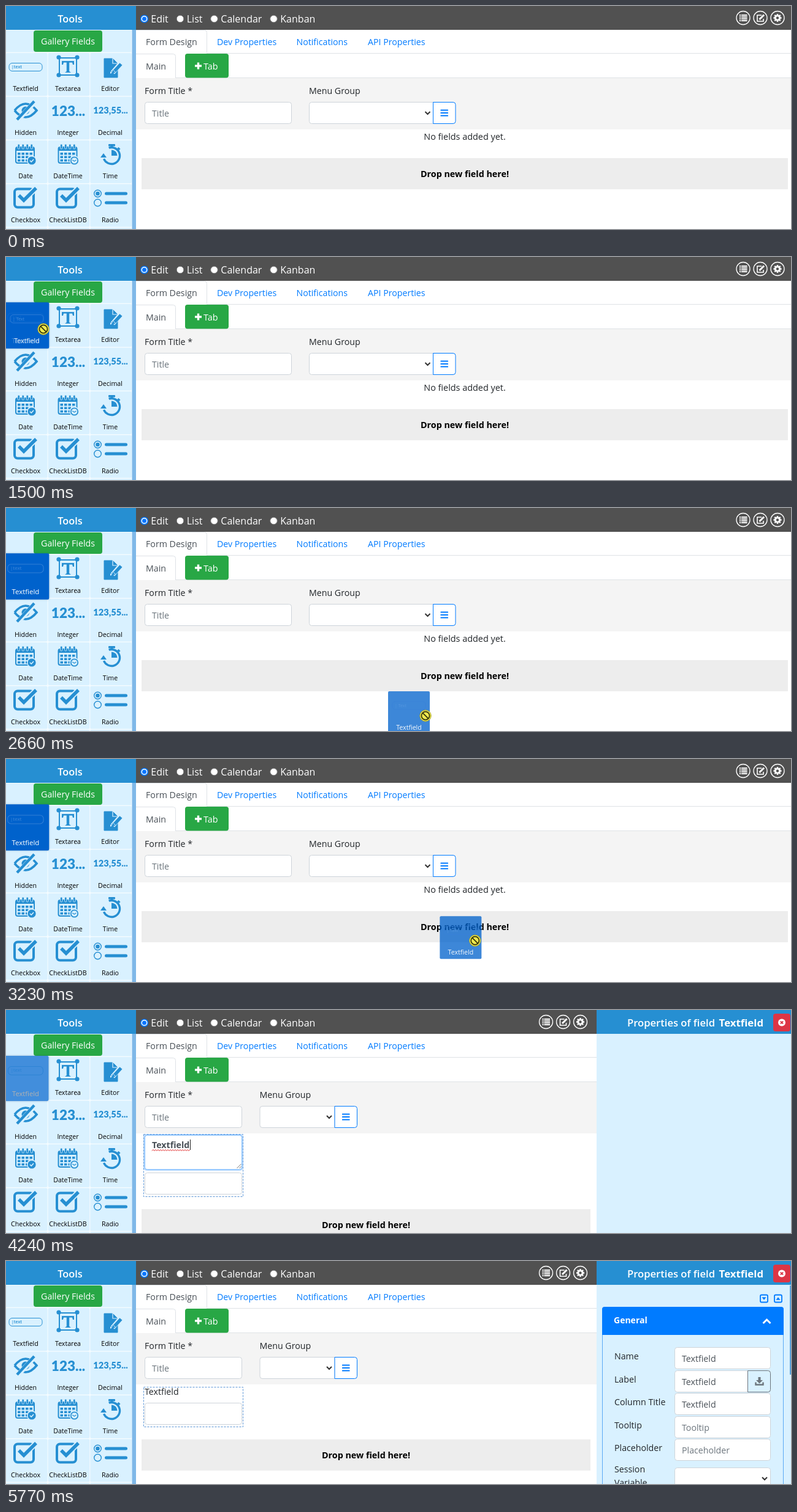
Animation, 1280 px wide and 365 px high, one loop 6.1 s. Source, as an HTML page with a canvas:

```html
<!DOCTYPE html>
<html lang="en">
<head>
<meta charset="utf-8">
<title>Form designer</title>
<style>
html, body { margin: 0; width: 100%; height: 100%; overflow: hidden; background: #fff; }
canvas { display: block; }
</style>
</head>
<body>
<canvas id="stage" width="1280" height="365"></canvas>
<script>
const c = document.getElementById('stage').getContext('2d');
const LOOP = 6100;
const BLUE = '#268fd2', PALE = '#d9f1ff', LINK = '#007bff', GREEN = '#28a745';
const INK = '#212529', GREY = '#6c757d', EDGE = '#ced4da', RULE = '#dee2e6';
const SANS = '"Open Sans", "Noto Sans", sans-serif';

// Moving spans: start, end, number of steps
const SPANS = [[240, 800, 9], [870, 1420, 8], [1500, 2100, 9], [2170, 2730, 9], [2800, 3360, 9], [3430, 3500, 2]];
// Time, pointer x, y
const POINTER = [[240, 1014, 349], [520, 600, 290], [730, 185, 205], [800, 110, 186], [870, 95, 160],
  [948, 88, 131], [1105, 62, 116], [1420, 60, 118]];
// Time, dragged tile x, y, badge x, y
const DRAG = [[1500, 0, 78, 61, 118], [1800, 36, 92, 100, 134], [2100, 160, 158, 230, 205], [2380, 405, 240, 470, 283],
  [2660, 623, 300, 684, 340], [2730, 650, 303, 708, 343], [3050, 692, 272, 750, 312], [3360, 720, 245, 777, 285], [3430, 720, 244, 777, 284]];
// Tile, hover start, hover end
const HOVERS = [[5, 690, 740], [4, 750, 860], [1, 870, 990], [0, 1000, 1500]];
const LABELS = ['Textfield', 'Textarea', 'Editor', 'Hidden', 'Integer', 'Decimal',
  'Date', 'DateTime', 'Time', 'Checkbox', 'CheckListDB', 'Radio'];

const clamp = v => Math.max(0, Math.min(1, v));
const mix = (a, b, k) => `rgb(${a.map((v, i) => Math.round(v + (b[i] - v) * k))})`;

function snap(t) {
  let out = t;
  for (const [a, b, n] of SPANS) {
    if (t >= a) out = a + Math.min(n - 1, Math.floor((t - a) / 70)) * (b - a) / (n - 1);
  }
  return out;
}

function along(keys, t) {
  let i = 0;
  while (i < keys.length - 2 && t >= keys[i + 1][0]) i++;
  const a = keys[i], b = keys[i + 1], k = clamp((t - a[0]) / (b[0] - a[0]));
  return a.slice(1).map((v, j) => v + (b[j + 1] - v) * k);
}

function rect(x, y, w, h, fill) {
  c.fillStyle = fill;
  c.fillRect(x, y, w, h);
}

function box(x, y, w, h, r, fill, stroke, lw = 1) {
  c.beginPath();
  c.roundRect(x, y, w, h, r);
  paint(fill, stroke, lw);
}

function disc(x, y, r, fill, stroke, lw = 1) {
  c.beginPath();
  c.arc(x, y, r, 0, 7);
  paint(fill, stroke, lw);
}

function path(pts, fill, stroke, lw = 1) {
  c.beginPath();
  for (let i = 0; i < pts.length; i += 2) c.lineTo(pts[i], pts[i + 1]);
  if (fill) c.closePath();
  paint(fill, stroke, lw);
}

function paint(fill, stroke, lw) {
  if (fill) { c.fillStyle = fill; c.fill(); }
  if (stroke) { c.strokeStyle = stroke; c.lineWidth = lw; c.stroke(); }
}

function text(s, x, y, color = INK, size = 14.2, weight = 400, align = 'left', family = SANS) {
  c.font = `${weight} ${size}px ${family}`;
  c.textAlign = align;
  c.fillStyle = color;
  c.fillText(s, x, y);
}

function calendar(x, ink, bg, clock) {
  box(x + 1, 231, 30, 26, 3, null, ink, 2);
  rect(x + 1, 231, 30, 6, ink);
  for (let i = 0; i < 4; i++) {
    box(x + 4 + i * 7, 226, 3.5, 8, 2, ink, bg, 0.8);
    for (let j = 0; j < 3; j++) rect(x + 4 + i * 6.5, 240 + j * 5.5, 4.5, 3.6, ink);
  }
  disc(x + 27, 253, 8, bg);
  if (clock) {
    disc(x + 27, 253, 5.7, null, ink, 1.7);
    path([x + 23.5, 252, x + 27, 254, x + 30, 252], null, ink, 1.2);
  } else {
    disc(x + 27, 253, 6.6, ink);
    path([x + 24, 253, x + 26.3, 255.2, x + 30, 251], null, bg, 1.6);
  }
}

function check(x, ink, bg) {
  box(x, 299.5, 31, 30, 5, null, ink, 4);
  path([x + 8, 311, x + 15, 318, x + 36, 297], null, bg, 9);
  path([x + 7, 310, x + 15, 318, x + 35, 298], null, ink, 5.5);
}

const ICONS = [
  ink => {
    box(5, 93.5, 54, 13, 5, null, ink);
    text('|text', 9, 102, ink, 7, 600);
  },
  ink => {
    box(87, 85, 28, 28, 0, null, ink, 2);
    for (const x of [86, 116]) for (const y of [84, 113]) disc(x, y, 3.6, ink);
    path([91, 90, 111, 90, 111, 96, 109, 96, 108, 92.5, 103.2, 92.5, 103.2, 107, 106, 109, 96, 109,
      98.8, 107, 98.8, 92.5, 94, 92.5, 93, 96, 91, 96], ink);
  },
  (ink, bg) => {
    path([160, 86, 174, 86, 182, 94, 182, 117, 160, 117], ink, ink, 1);
    path([174, 85, 174, 94, 183, 94], null, bg, 1.2);
    path([187, 94, 174, 109], null, bg, 8);
    path([187.5, 95, 177, 106.5], null, ink, 5.5);
    path([174, 104.5, 178.5, 109, 172.5, 110.5], ink);
    path([170, 107, 173, 109, 170, 111], bg);
  },
  (ink, bg) => {
    c.beginPath();
    c.moveTo(14, 171);
    c.quadraticCurveTo(32, 149, 50, 171);
    c.quadraticCurveTo(32, 193, 14, 171);
    paint(null, ink, 3.6);
    disc(32, 171, 6.5, ink);
    path([48, 156, 18, 188], null, bg, 8);
    path([46, 156, 18, 186], null, ink, 4.5);
  },
  ink => text('123...', 101.5, 179.5, ink, 22.5, 900, 'center', 'Lato, sans-serif'),
  ink => text('123,55...', 170.5, 175.5, ink, 14.6, 900, 'center', 'Lato, sans-serif'),
  (ink, bg) => calendar(15, ink, bg, false),
  (ink, bg) => calendar(84.5, ink, bg, true),
  ink => {
    c.beginPath();
    c.arc(172, 245, 13.5, -1.9, 2.75);
    paint(null, ink, 3.4);
    path([154, 248, 164, 248, 159, 241], ink);
    box(167, 226, 11, 3.5, 1, ink);
    rect(170.5, 228, 4, 4, ink);
    path([182.5, 232, 185.5, 235], null, ink, 3);
    c.beginPath();
    c.moveTo(172, 245);
    c.arc(172, 245, 9.5, -Math.PI / 2, 0);
    paint(ink);
  },
  (ink, bg) => check(14, ink, bg),
  (ink, bg) => check(83, ink, bg),
  ink => {
    for (const y of [307, 322]) {
      disc(149.5, y, 5.8, null, ink, 1.4);
      box(161, y - 2.5, 37, 5, 2.5, ink);
    }
    disc(149.5, 307, 3.3, ink);
  }
];

// hot: hover amount, down: pressed amount
function tile(i, hot = 0, down = 0) {
  const x = (i % 3) * 68.7, y = 77 + Math.floor(i / 3) * 71.5;
  const light = mix([217, 241, 255], [162, 212, 255], hot);
  const bg = down ? mix([217, 241, 255], [0, 98, 204], down) : light;
  const ink = mix([38, 143, 210], [50, 127, 214], down);
  const label = down ? mix([0, 0, 0], [255, 255, 255], down) : mix([0, 0, 0], [190, 190, 188], hot);
  const k = 1 + 0.08 * Math.max(hot, down);
  c.save();
  c.translate(x + 33.5, y + 35);
  c.scale(k, k);
  c.translate(-x - 33.5, -y - 35);
  if (k > 1) { c.shadowColor = 'rgba(0,60,120,.35)'; c.shadowBlur = 3; }
  box(x, y, 67.5, 70, 2, bg);
  c.shadowColor = 'transparent';
  ICONS[i](ink, bg);
  text(LABELS[i], 32 + (i % 3) * 69, y + 62, label, 10.6, 400, 'center');
  c.restore();
}

function tools(t, pose) {
  rect(0, 39, 212, 326, '#f3fbff');
  rect(0, 40, 204.5, 35.5, PALE);
  rect(205.5, 39, 6.5, 326, '#7fb8e8');
  for (let x = 0; x < 3; x++) box(x * 68.7, 363, 67.5, 10, 2, PALE);
  box(45, 40, 112, 35, 4, GREEN);
  text('Gallery Fields', 101, 63, '#fff', 14.2, 400, 'center');
  const lit = [];
  for (let i = 0; i < 12; i++) {
    const down = i || t < 1500 ? 0 : 1 - clamp((t - 4180) / 200);
    let hot = 0;
    for (const [n, a, b] of HOVERS) {
      if (n === i) hot = clamp((pose - a) / 50) * (1 - clamp((pose - b) / 50));
    }
    if (hot || down) lit.push([i, hot, down]);
    else tile(i);
  }
  c.save();
  c.beginPath();
  c.rect(0, 39, 205, 326);
  c.clip();
  lit.forEach(a => tile(...a));
  c.restore();
  rect(0, 0, 212, 39, BLUE);
  text('Tools', 104.5, 27, '#fff', 16.3, 600, 'center');
}

function topBar(right) {
  rect(212, 0, right - 212, 39, '#515151');
  [['Edit', 225.5], ['List', 284], ['Calendar', 339.5], ['Kanban', 436.5]].forEach(([s, x], i) => {
    disc(x, 21, 5.8, '#fff', i ? '#767676' : '#0075ff', i ? 1 : 1.6);
    if (!i) disc(x, 21, 3.5, '#0075ff');
    text(s, x + 10.8, 27, '#fff', 16);
  });
  const x = right === 1280 ? 1202 : 880.5;
  for (let i = 0; i < 3; i++) disc(x + i * 28, 19.5, 11, null, '#fff', 1.3);
  for (let i = 0; i < 4; i++) {
    rect(x - 6, 14 + i * 3, 2, 2, '#fff');
    rect(x - 3, 14 + i * 3, 9.5, 2, '#fff');
  }
  path([x + 30, 15, x + 23, 15, x + 23, 25, x + 33, 25, x + 33, 21], null, '#fff', 1.6);
  path([x + 26.5, 22, x + 34, 14.5], null, '#fff', 3);
  for (let i = 0; i < 8; i++) {
    const a = i * Math.PI / 4, dx = Math.cos(a), dy = Math.sin(a);
    path([x + 56 + dx * 3, 19.5 + dy * 3, x + 56 + dx * 6.5, 19.5 + dy * 6.5], null, '#fff', 2.6);
  }
  disc(x + 56, 19.5, 3.6, null, '#fff', 2.8);
}

function chevron(x, y) {
  path([x - 4, y - 2, x, y + 2, x + 4, y - 2], null, '#333', 2);
}

function field(x, y, w, s = '', color = '#495057', h = 35) {
  box(x + 0.5, y + 0.5, w - 1, h, 4, '#fff', EDGE);
  if (s) text(s, x + 12, y + 24, color);
}

function bars(x, y) {
  for (let i = -1; i < 2; i++) box(x - 6, y + i * 4.5 - 1, 12.5, 2.1, 0.5, LINK);
}

function dropZone(y, right) {
  rect(221, y, right - 221, 51, '#ededed');
  text('Drop new field here!', (221 + right) / 2, y + 31, '#000', 14.3, 700, 'center');
}

function form(right) {
  const open = right < 1280;
  rect(212, 39, right - 212, 326, '#fff');
  rect(212, 77, right - 212, 1, RULE);
  rect(212, 117, right - 212, 1, RULE);
  rect(212, 118, right - 212, 84, '#f4f4f4');
  box(205.5, 39.5, 122, 45, 4, '#fff', RULE);
  rect(200, 78, 140, 10, '#fff');
  box(205.5, 78.5, 71, 45, 4, '#fff', RULE);
  rect(212, 118, 70, 10, '#f4f4f4');
  text('Form Design', 228, 64, '#495057');
  text('Dev Properties', 344, 64, LINK);
  text('Notifications', 473.5, 64, LINK);
  text('API Properties', 590, 64, LINK);
  text('Main', 228, 103.5, '#495057');
  box(292, 78, 71, 39.5, 4, GREEN);
  rect(308, 96.3, 11, 3.4, '#fff');
  rect(311.8, 92.5, 3.4, 11, '#fff');
  text('Tab', 322, 103.5, '#fff', 14.4);

  const x = open ? 413.5 : 494, w = open ? 122 : 202;
  text('Form Title *', 226, 144);
  text('Menu Group', x, 144);
  field(226, 157, open ? 159 : 240, 'Title', GREY);
  box(x + 0.5, 157.5, w, 35, [4, 0, 0, 4], '#fff', EDGE);
  chevron(x + w - 8.5, 175);
  box(x + w + 0.5, 157.5, 36.5, 35, [0, 4, 4, 0], '#fff', LINK);
  bars(x + w + 18.5, 175);
}

function dashed(y, h) {
  c.setLineDash([3, 2]);
  box(224.5, y + 0.5, 162, h, 0, null, '#5b95d6');
  c.setLineDash([]);
}

function added(editing) {
  if (!editing) {
    dashed(206, 65);
    text('Textfield', 226, 219);
    field(226, 232, 159);
    dropZone(292, 953);
    return;
  }
  box(225.5, 204.5, 160, 57, 4, '#fff', '#bfdeff', 3);
  box(226.5, 204.5, 158, 57, 4, null, '#80bdff');
  dashed(203, 102);
  text('Textfield', 238, 226, '#495057', 14.2, 700);
  const wave = [];
  for (let i = 0; i <= 31; i++) wave.push(238 + i * 2, i % 2 ? 228.5 : 230.5);
  path(wave, null, '#e02020', 1);
  rect(300, 212, 1, 17, '#222');
  path([376.5, 259, 383.5, 252], null, '#777');
  path([380.5, 259, 383.5, 256], null, '#777');
  field(226, 266, 159);
  dropZone(326, 953);
}

function properties(filled) {
  rect(963, 0, 317, 365, PALE);
  rect(963, 0, 317, 39, BLUE);
  text('Properties of field', 1156, 27, '#fff', 16.6, 600, 'right');
  text('Textfield', 1235, 27, '#fff', 16.8, 700, 'right');
  box(1251, 6, 28, 29, 4, '#dc3545');
  disc(1265, 20.5, 6, '#fff');
  path([1262.8, 18.3, 1267.2, 22.7], null, '#dc3545', 1.8);
  path([1267.2, 18.3, 1262.8, 22.7], null, '#dc3545', 1.8);
  if (!filled) return;

  [1236, 1259].forEach((x, i) => {
    const d = i ? -2.2 : 2.2;
    box(x - 6, 55.5, 12, 12, 2, null, LINK, 1.8);
    path([x - 3.5, 61.5 - d, x + 3.5, 61.5 - d, x, 61.5 + d], LINK);
  });
  box(972.5, 75.5, 295, 300, 4, PALE, '#5aa9f5');
  box(972, 75, 296, 46, [4, 4, 0, 0], LINK);
  text('General', 991, 102, '#fff', 14, 700);
  path([1234.5, 102, 1240.5, 96, 1246.5, 102], null, '#fff', 3);
  ['Name', 'Label', 'Column Title', 'Tooltip', 'Placeholder', 'Session'].forEach((s, i) => {
    const y = 141 + i * 37.6;
    text(s, 992, y + 20 - (i === 5 ? 3 : 0));
    if (i < 5) field(1090, Math.round(y), 157, i < 3 ? 'Textfield' : s, i < 3 ? '#495057' : GREY);
  });
  text('Variable', 992, 368);
  field(1090, 338, 157);
  chevron(1237, 356);
  box(1209.5, 179.5, 37, 35, [0, 4, 4, 0], PALE, GREY);
  rect(1226.5, 190, 4, 6, GREY);
  path([1223, 195, 1234, 195, 1228.5, 200.5], GREY);
  path([1222.5, 198.5, 1222.5, 202.5, 1234.5, 202.5, 1234.5, 198.5], null, GREY, 2.4);
  rect(1278, 40, 2, 146, '#5ba4dc');
}

function pointer(x, y) {
  c.save();
  c.translate(x, y);
  c.lineJoin = 'round';
  if (x > 205) {
    path([0, 0, 0, 16, 3.7, 12.6, 6.2, 18.5, 8.6, 17.5, 6.2, 11.7, 11.5, 11.7], '#fff', '#000', 1);
  } else {
    path([-1.5, 1, 0, 0, 1.5, 1, 1.5, 7, 3, 6.3, 4.8, 7.5, 6.3, 7, 8, 8.3, 9.4, 8.2, 10.3, 9.5,
      10.3, 15, 8, 20.5, -0.5, 20.5, -5.2, 13, -4.6, 11.5, -3, 11.6, -1.5, 13.3], '#fff', '#000', 1.2);
    for (const dx of [1.6, 4.8, 8]) path([dx, 8, dx, 11], null, '#000', 0.9);
  }
  c.restore();
}

function drag(pose) {
  const [x, y, bx, by] = along(DRAG, pose);
  c.save();
  c.globalAlpha = 0.76;
  box(x, y, 68, 70, 2, '#0062cc');
  box(x + 7, y + 16.5, 54, 13.5, 5, null, '#3a83d9');
  text('| Text', x + 11, y + 26, '#5a9be2', 7);
  c.globalAlpha = 0.95;
  text('Textfield', x + 34, y + 63, '#fff', 10.6, 400, 'center');
  c.restore();
  disc(bx, by, 9.2, '#efe94f', '#a8a22a', 1);
  disc(bx, by, 6.6, null, '#37350a', 1.7);
  path([bx - 4.6, by - 4.6, bx + 4.6, by + 4.6], null, '#37350a', 1.8);
}

function draw(t) {
  const pose = snap(t), open = t >= 4180;
  c.clearRect(0, 0, 1280, 365);
  form(open ? 963 : 1280);
  topBar(open ? 963 : 1280);
  if (open) {
    added(t < 5770);
    properties(t >= 4780);
  } else {
    text('No fields added yet.', 748, 219, INK, 14.4, 400, 'center');
    dropZone(249, 1275);
  }
  tools(t, pose);
  if (t >= 240 && t < 1500) pointer(...along(POINTER, pose));
  if (t >= 1500 && t < 3500) drag(pose);
}

const start = performance.now();
function tick() {
  draw((performance.now() - start) % LOOP);
  requestAnimationFrame(tick);
}
tick();
</script>
</body>
</html>
```
